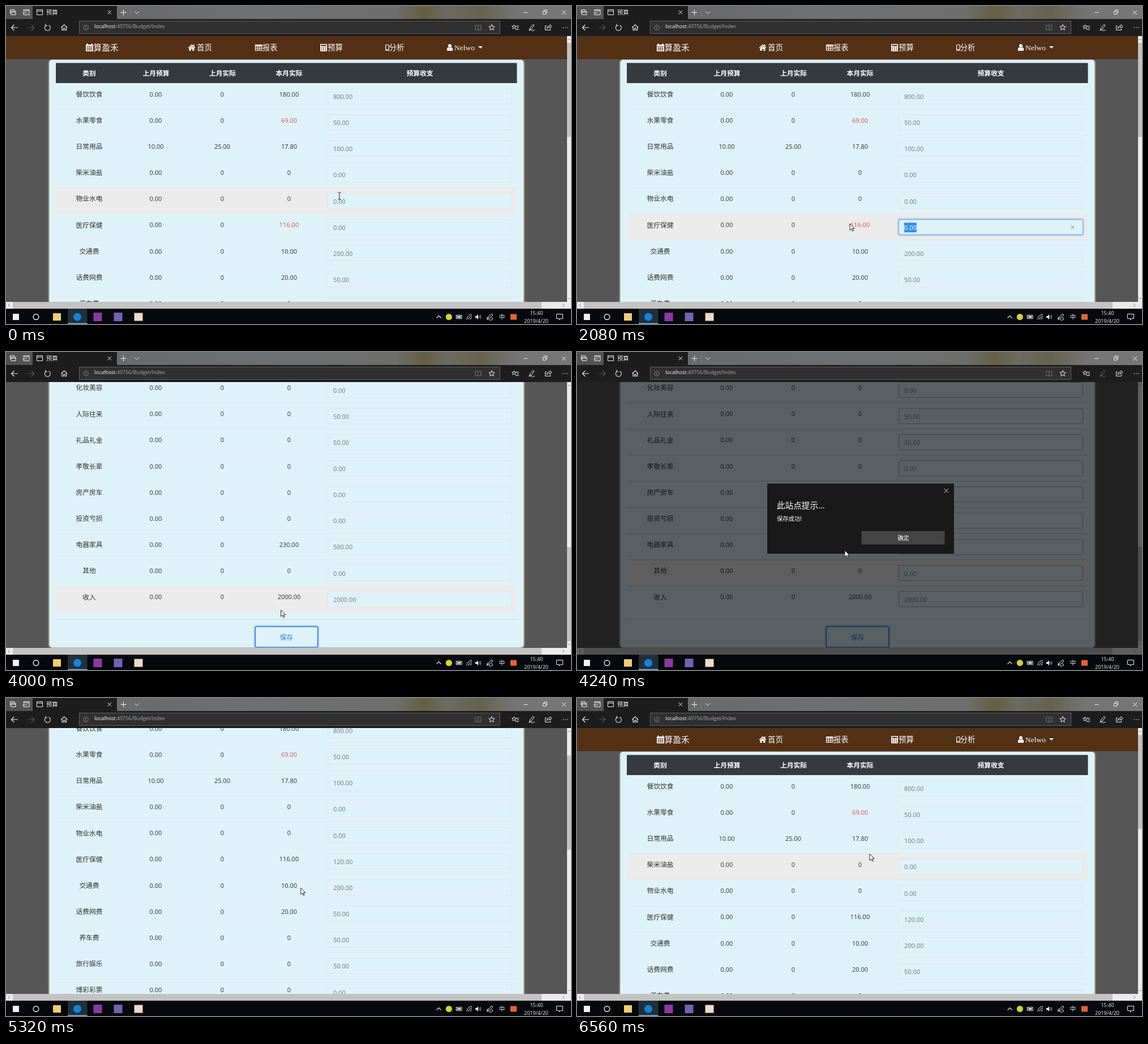
Write an HTML page that moves like this. It is 998 px wide and 561 px high and loops after 6.6 s.

```html
<!DOCTYPE html>
<html lang="zh">
<head>
<meta charset="utf-8">
<title>预算</title>
<style>
html, body { margin: 0; width: 100%; height: 100%; overflow: hidden; background: #565656; }
svg { display: block; width: 998px; height: 561px; }
text { font-family: "Open Sans", "Noto Sans CJK SC", "Noto Sans CJK", sans-serif; white-space: pre; }
.line { stroke: #e6e4e2; fill: none; }
.dim .line { stroke: #a9adb0; }
</style>
</head>
<body>
<svg id="stage" viewBox="0 0 998 561"></svg>
<script>
const LOOP = 6600, STEP = 40;
const ROW = 46.15, TOP = 136, END = 784.7;
const CARD = '#def2fa', INK = '#343434', RED = '#d9534f';
const stage = document.getElementById('stage');

function el(tag, attrs, parent = stage) {
  const node = document.createElementNS('http://www.w3.org/2000/svg', tag);
  for (const k in attrs) node.setAttribute(k, attrs[k]);
  parent.appendChild(node);
  return node;
}
const set = (node, attrs) => { for (const k in attrs) node.setAttribute(k, attrs[k]); };
const show = (node, on) => node.setAttribute('visibility', on ? 'visible' : 'hidden');
const group = (parent, attrs = {}) => el('g', attrs, parent);
const box = (x, y, width, height, fill, parent, more = {}) =>
  el('rect', { x, y, width, height, fill, ...more }, parent);
const stroke = (d, color, parent, width = 1) =>
  el('path', { d, fill: 'none', stroke: color, 'stroke-width': width }, parent);
const shape = (d, fill, parent) => el('path', { d, fill }, parent);
const ring = (cx, cy, r, color, parent, width = 1) =>
  el('circle', { cx, cy, r, fill: 'none', stroke: color, 'stroke-width': width }, parent);
const dot = (cx, cy, r, fill, parent) => el('circle', { cx, cy, r, fill }, parent);

function label(str, x, cy, size, fill, parent, more = {}) {
  const node = el('text', { x, y: cy + size * 0.365, 'font-size': size, fill, ...more }, parent);
  node.textContent = str;
  return node;
}
const mid = { 'text-anchor': 'middle' };

// Gradients and clipping
const defs = el('defs', {});
function gradient(id, stops) {
  const g = el('linearGradient', { id }, defs);
  stops.forEach(([offset, color]) => el('stop', { offset, 'stop-color': color }, g));
}
gradient('glass', [[0, '#505050'], [.2, '#686a6b'], [.45, '#6c7072'], [.69, '#6d6d6b'],
  [.74, '#665f42'], [.78, '#6c6a62'], [.84, '#67624f'], [.9, '#747474'], [1, '#777']]);
box(0, 53, 991, 469, '#fff', el('clipPath', { id: 'view' }, defs));
const blur = el('filter', { id: 'soft', x: '-5%', y: '-5%', width: '110%', height: '110%' }, defs);
el('feGaussianBlur', { stdDeviation: 1.1 }, blur);

// Page
const root = group(stage);
box(0, 53, 998, 481, '#565656', root);
const view = group(root, { 'clip-path': 'url(#view)' });
const page = group(view);
box(75.5, 94.5, 840, 1212.5, '#cdbf9f', page, { rx: 6, filter: 'url(#soft)' });
box(76.5, 95, 837.5, 1211, CARD, page, { rx: 5 });
buildNav();

box(88, 100.5, 814.5, 35.5, '#343a40', page);
[['类别', 147], ['上月预算', 265], ['上月实际', 382.5], ['本月实际', 500], ['预算收支', 731]]
  .forEach(([s, x]) => label(s, x, 119, 11.75, '#fff', page, { ...mid, 'font-weight': 700 }));

const hoverBar = box(88, 0, 814.5, ROW, '#ebebeb', page);
const names = ('餐饮饮食 水果零食 日常用品 柴米油盐 物业水电 医疗保健 交通费 话费网费 养车费 旅行娱乐 博彩彩票 书报音像 ' +
  '数码产品 教育培训 服饰装扮 化妆美容 人际往来 礼品礼金 孝敬长辈 房产房车 投资亏损 电器家具 其他 收入').split(' ');
const actual = { 0: '180.00', 1: '69.00', 2: '17.80', 5: '116.00', 6: '10.00', 7: '20.00', 21: '230.00', 23: '2000.00' };
const budget = { 0: 800, 1: 50, 2: 100, 6: 200, 7: 50, 8: 50, 9: 50, 16: 50, 17: 50, 21: 500, 23: 2000 };
const MED = 5;
let medActual, medValue;

names.forEach((name, i) => {
  const y = TOP + i * ROW, c = y + 19.6;
  const cell = (s, x, color = INK) => label(s, x, c, 11, color, page, mid);
  if (i) el('path', { class: 'line', d: `M88 ${y}H902`, 'stroke-width': .6 }, page);
  label(name, 147, c, 11.75, INK, page, mid);
  cell(i === 2 ? '10.00' : '0.00', 264.5);
  cell(i === 2 ? '25.00' : '0', 382);
  const sum = cell(actual[i] || '0', 500, i === 1 ? RED : INK);
  box(568.5, y + 9.8, 325, 27, CARD, page, { rx: 2.5, class: 'line', style: `fill:${CARD}` });
  const value = label((budget[i] || 0).toFixed(2), 578, y + 24, 11, '#73787c', page);
  if (i === MED) { medActual = sum; medValue = value; }
});

// Focused field
const medY = TOP + MED * ROW;
const focus = group(page);
box(567.3, medY + 9, 327, 28.6, 'none', focus, { rx: 3.5, stroke: '#a9d2f2', 'stroke-width': 3 });
box(568.5, medY + 10, 325, 26.6, 'none', focus, { rx: 2.5, stroke: '#79b4e6' });
stroke(`M872.5 ${medY + 20.5}l6 6m0 -6l-6 6`, '#666', focus, .9);
const marked = box(578, medY + 15.5, 0, 17, '#2f8ff0', focus);
const caret = box(578, medY + 17, 1, 14, '#222', focus);
const medMarked = label('0.00', 578, medY + 24, 11, '#fff', focus);

// Save button
el('path', { d: 'M88 1256.2H902', stroke: '#d3dadd' }, page);
const saveGlow = box(439.5, 1268.4, 112, 38, 'none', page, { rx: 3.5, stroke: '#8fc0f3', 'stroke-width': 3 });
box(440.5, 1269.4, 110, 36, CARD, page, { rx: 2.5, stroke: '#2f7fdb', 'stroke-width': 1.3 });
label('保存', 495.5, 1288, 11.75, '#2f7fd0', page, mid);

// Scroll bars
box(991, 53, 7, 469, '#ededed', root);
const thumb = box(991, 65, 7, 166, '#c1c1c1', root);
stroke('M992.5 60l2 -2l2 2M992.5 515l2 2l2 -2', '#777', root);
box(0, 522, 998, 12, '#ebebeb', root);
box(12, 522, 934, 12, '#c3c3c3', root);
stroke('M7 525l-3 3l3 3M983 525l3 3l-3 3', '#888', root);

// Message box
const modal = group(stage);
box(0, 53, 998, 481, '#000', modal, { opacity: .6 });
box(335.5, 231.5, 331, 125, '#191919', modal, { stroke: '#666' });
stroke('M648.5 241l7.5 7.5m0 -7.5l-7.5 7.5', '#ddd', modal);
label('此站点提示...', 353, 270.5, 14.6, '#fff', modal);
label('保存成功!', 353, 294.5, 10.3, '#fff', modal);
box(502.5, 316, 147, 23.5, '#454545', modal);
label('确定', 576.5, 328, 10.3, '#fff', modal, mid);

const penIcon = buildBrowser();
buildTaskbar();

// Pointers
const arrow = group(stage);
el('path', { d: 'M0 0V11.5L2.7 9L4.5 13.2L6.3 12.4L4.5 8.4H8.2Z', fill: '#fff', stroke: '#111', 'stroke-width': .9 }, arrow);
const beam = group(stage);
stroke('M-2.5 -6H-.6L0 -5.4L.6 -6H2.5M0 -5.4V5.4M-2.5 6H-.6L0 5.4L.6 6H2.5', '#222', beam);

function buildNav() {
  const W = '#fff';
  box(0, 53, 991, 41, '#533115', page);
  // calendar
  shape('M141 68h13v12h-13z', W, page);
  stroke('M143.5 66v3M151.5 66v3', W, page, 1.8);
  stroke('M142 71.5h11M142 74.5h11M142 77.3h11M144.5 71v8M147.5 71v8M150.5 71v8', '#533115', page, .8);
  label('算盈禾', 154.5, 73.5, 14.7, W, page);
  // house
  shape('M321.5 73.5L328 67.5L330.6 70V68h2v3.8L334.5 73.5L333.5 74.4L328 69.5L322.5 74.4ZM323.5 74.5L328 70.6L332.5 74.5V79H329.3V75.5H326.7V79H323.5Z', W, page);
  label('首页', 337, 73.5, 13.5, W, page);
  // grid
  stroke('M440.5 68.5h11.5v10h-11.5zM440.5 72h11.5M440.5 75.2h11.5M444.3 69v9.5M448.2 69v9.5', W, page, 1.1);
  box(440, 68, 12.5, 2.2, W, page);
  label('报表', 453, 73.5, 13.2, W, page);
  // calculator
  box(555, 67, 12, 13, W, page, { rx: 1 });
  box(556.5, 68.5, 9, 2.3, '#533115', page);
  for (let i = 0; i < 9; i++) box(556.6 + i % 3 * 3.4, 72.5 + (i / 3 | 0) * 2.4, 1.8, 1.3, '#533115', page);
  label('预算', 568, 73.5, 13.5, W, page);
  // handset
  box(670.6, 68.5, 5.6, 10, 'none', page, { rx: 1, stroke: W, 'stroke-width': 1.2 });
  stroke('M671 76.8h5', W, page);
  label('分析', 676.5, 73.5, 13.5, W, page);
  // person
  dot(784, 70.3, 3, W, page);
  shape('M779 79V76Q779 73 781.5 73Q784 74.7 786.5 73Q789 73 789 76V79Z', W, page);
  el('text', { x: 792, y: 78, 'font-size': 13.5, fill: W, style: 'font-family:"Liberation Serif",serif' }, page)
    .textContent = 'Nelwo';
  shape('M834 71h8l-4 4z', W, page);
}

function buildBrowser() {
  const g = group(stage), W = '#f0f0f0', G = '#777';
  box(0, 0, 998, 23, 'url(#glass)', g);
  box(47, 0, 149, 23, '#1d1d1d', g);
  box(0, 23, 998, 30, '#1d1d1d', g);
  stroke('M7.5 8.5v-2h7v2M9 9h8v6.5h-8zM9 11h8M7.5 6.5v6h1.5', W, g);
  stroke('M31 9V6.5h10v9h-10v-2M31 8.5h10M37.5 12h-7.5m2 -2l-2 2l2 2', W, g);
  stroke('M54.5 6.5h10v9h-10zM54.5 9h10', W, g);
  label('预算', 71, 10.8, 10.3, W, g);
  stroke('M179.5 8l6.5 6.5m0 -6.5l-6.5 6.5M202.5 11.5h10M207.5 6.5v10M227 9.5l4 4l4 -4', W, g);
  stroke('M196.5 4v15M219.5 5v13', '#858585', g, .7);
  stroke('M914.5 11.5h7M948.5 9.5h5v5h-5zM950.5 9v-2h5v5h-2M982 8l7 7m0 -7l-7 7', W, g);
  // navigation
  stroke('M21 38H9.5m5 -5l-5 5l5 5', W, g, 1.1);
  stroke('M39 38h11m-5 -5l5 5l-5 5', '#595959', g, 1.1);
  stroke('M70.5 34.2A5 5 0 1 0 75.5 33.8M70 31.5v3.2h3.2', W, g, 1.1);
  stroke('M97.5 38l5.3 -5l5.3 5M99 37v5.8h2.6v-3.5h2.4v3.5h2.6v-5.8', W, g, 1.1);
  // address
  box(129.5, 26.5, 743, 22, '#303030', g, { stroke: '#606060' });
  ring(141, 38, 4.2, '#999', g, .8);
  stroke('M141 37.3v3M141 35.3v1', '#999', g);
  const url = label('', 156, 36, 8.95, '#a9a9a9', g);
  el('tspan', { fill: '#fff' }, url).textContent = 'localhost';
  el('tspan', {}, url).textContent = ':49756/Budget/Index';
  stroke('M834 34.5q-2.5 -1.5 -5 -.5v8q2.5 -1 5 .5q2.5 -1.5 5 -.5v-8q-2.5 -1 -5 .5v8', G, g);
  const star = (x, y, r) => {
    let d = '';
    for (let i = 0; i < 10; i++) {
      const a = i * Math.PI / 5, q = i % 2 ? r * .43 : r;
      d += `${i ? 'L' : 'M'}${x + q * Math.sin(a)} ${y - q * Math.cos(a)}`;
    }
    stroke(d + 'Z', W, g);
  };
  star(858, 38, 5.5);
  star(897.5, 37, 4);
  stroke('M901 35.5h5M902 38.5h4M900 41.5h6', W, g);
  const pen = stroke('M924 43l2 -5l5 -5.5l2 1.7l-4.5 6zM924 43q5 -2 5 0t5 -1', W, g);
  stroke('M955 35h-2.5v7.5h9v-2.5M955 40q.5 -5 6 -5.2v-2l3 3.2l-3 3.2v-2q-4 0 -6 2.8', W, g);
  [984, 988, 992].forEach(x => dot(x, 38, .8, W, g));
  return pen;
}

function buildTaskbar() {
  const g = group(stage), W = '#f0f0f0';
  box(0, 534, 998, 27, '#05080c', g);
  box(12, 543, 11, 11, W, g);
  ring(53, 548.5, 4.8, W, g, 1.4);
  box(83, 542, 14, 13, '#f3ce6c', g);
  box(109, 534, 34.5, 27, '#20303c', g);
  box(109, 559.5, 34.5, 1.5, '#76b9ed', g);
  dot(126, 548.5, 7, '#1583d8', g);
  box(154.5, 541, 15, 15, '#8a3aa5', g);
  box(190.5, 541, 15, 15, '#7461b5', g);
  box(226.5, 541.5, 15, 14, '#f0d9c8', g);
  // tray
  stroke('M760.5 550.5l4 -4l4 4', W, g, 1.1);
  dot(782.3, 548.5, 5.6, '#d6d71f', g);
  stroke('M796 545.5h9v6h-9zM794 546.5h2M794 550h2', W, g);
  box(797.5, 547, 6, 3, W, g);
  [3, 6, 9].forEach(r => stroke(`M${823 - r} 553A${r} ${r} 0 0 1 823 ${553 - r}`, W, g));
  shape('M829 547h2l3 -3v9l-3 -3h-2z', W, g);
  stroke('M835.5 546.5q1.5 2 0 4M837.5 545q2.5 3.5 0 7', W, g, .8);
  stroke('M850 553l2 -4l6 -6l2 2l-6 6zM850 553q-1 -5 2 -4M857 550q4 0 2 3t-6 0', W, g);
  label('中', 876, 548.5, 10.5, W, g, mid);
  box(891, 543.5, 11, 10, '#ee6130', g);
  label('15:40', 937, 541.5, 9.1, W, g, mid);
  label('2019/4/20', 936.5, 555.5, 9.1, W, g, mid);
  stroke('M972.5 543.5h11v8h-4l-2 2.5v-2.5h-5z', W, g);
}

// Tracks: time, then values
const pointer = [
  [0, 589, 335], [120, 589, 335], [520, 602, 391], [1200, 602, 391], [1880, 482, 384], [2560, 482, 384],
  [2800, 468, 408], [3520, 468, 408], [3800, 492, 496], [3920, 492, 496], [4120, 474, 380],
  [4240, 473, 350], [4380, 572, 326], [4440, 572, 326], [4600, 519, 328], [5500, 521, 336],
  [5760, 523, 344], [6160, 523, 344], [6480, 517, 275], [6600, 517, 275]
];
const scrolling = [
  [0, 0], [2820, 0], [3200, 447.7], [3260, 447.7], [3560, END], [4840, END], [5460, 0], [6600, 0]
];
const typing = [[0, '0.00'], [2200, '1'], [2360, '12'], [2520, '120'], [2760, '120.00']];

function at(track, t) {
  let i = 1;
  while (i < track.length - 1 && track[i][0] <= t) i++;
  const a = track[i - 1], b = track[i];
  const p = Math.min(1, (t - a[0]) / (b[0] - a[0])), e = p * p * (3 - 2 * p);
  return a.slice(1).map((v, k) => v + (b[k + 1] - v) * e);
}
const within = (t, a, b) => t >= a && t < b;

function draw(t) {
  const [x, y] = at(pointer, t), [s] = at(scrolling, t);
  const moving = within(t, 2800, 3600) || within(t, 4840, 5500);
  const asking = within(t, 4120, 4440);
  set(page, { transform: `translate(0 ${-s})` });
  set(thumb, { y: 65 + s * .356 });

  const under = Math.floor((y + s - TOP) / ROW);
  const row = asking ? 22 : under;
  show(hoverBar, !moving && row >= 0 && row < names.length);
  set(hoverBar, { y: TOP + row * ROW });

  const focused = within(t, 560, 2760);
  const text = typing.filter(k => k[0] <= t).pop()[1];
  const picked = t < 1200 || t >= 2200 ? 0 : 599.8 - Math.max(578, Math.min(599.8, x));
  medValue.textContent = text;
  set(medActual, { fill: t < 2760 ? RED : INK });
  show(focus, focused);
  set(marked, { x: 599.8 - picked, width: picked });
  show(medMarked, focused && picked > 20);
  show(caret, focused && picked === 0);
  set(caret, { x: t < 2200 ? 600 : 578.5 + 6.3 * text.length });

  show(saveGlow, t >= 3840);
  show(modal, asking);
  set(root, { class: asking ? 'dim' : '' });
  set(penIcon, { stroke: asking ? '#666' : '#f0f0f0' });

  const inRow = y + s - TOP - under * ROW;
  const overField = !moving && !asking && under < names.length && x > 568 && x < 894 && inRow > 9 && inRow < 37;
  const dragging = within(t, 1200, 1800);
  const textual = overField || dragging || t < 560;
  const place = { transform: `translate(${x} ${y})` };
  set(arrow, place);
  set(beam, place);
  show(arrow, !textual);
  show(beam, textual);
}

const start = performance.now();
function tick(now) {
  const t = Math.max(0, now - start) % LOOP;
  draw(Math.floor(t / STEP) * STEP);
  requestAnimationFrame(tick);
}
draw(0);
requestAnimationFrame(tick);
</script>
</body>
</html>
```
